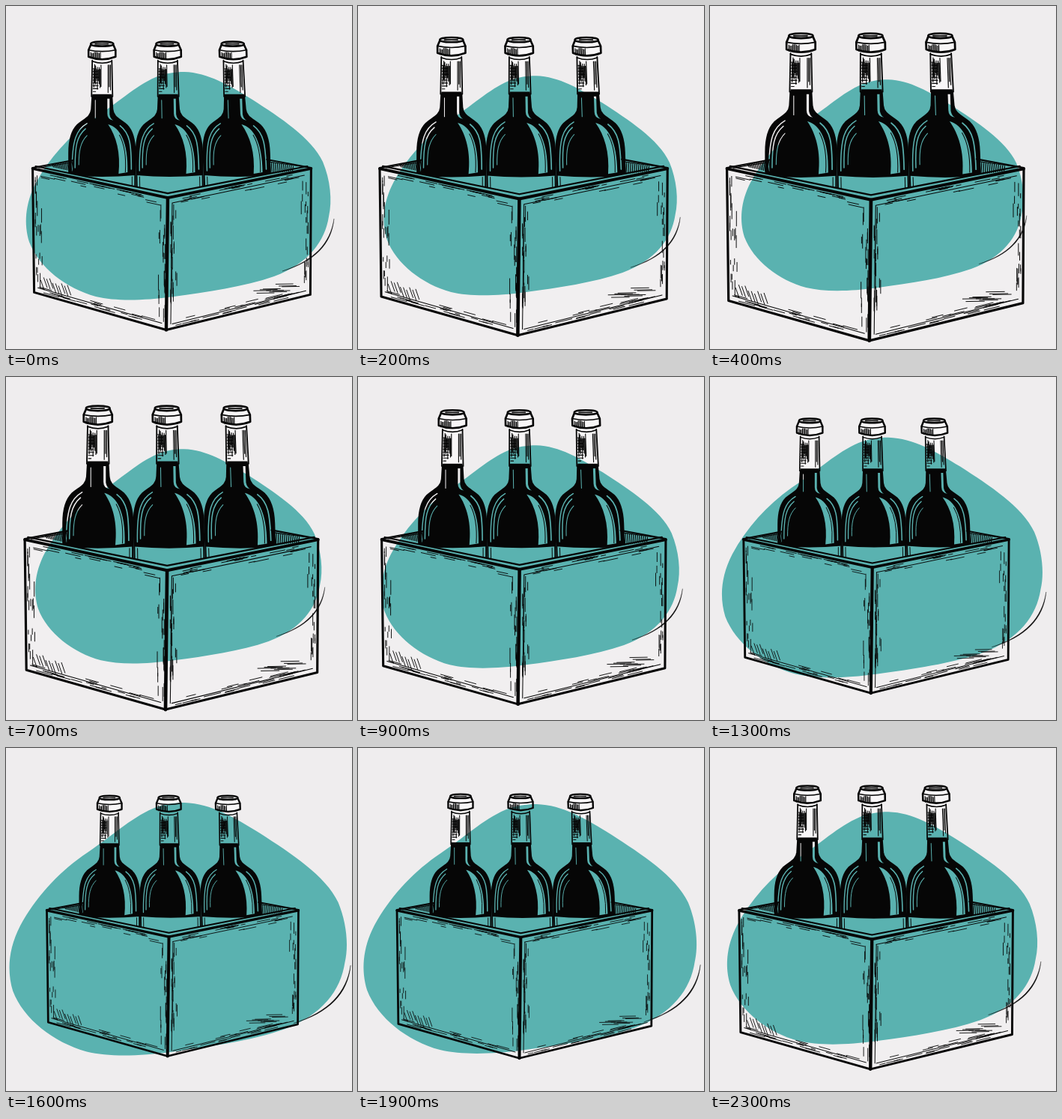
These frames come from a looping animation (462 by 458 pixels, 2.4 s). An HTML page:

```html
<!DOCTYPE html>
<html lang="en">
<head>
<meta charset="utf-8">
<title>Wine crate</title>
<style>
  html, body { margin: 0; width: 100%; height: 100%; overflow: hidden; background: #efedee; }
  svg { display: block; width: 100vw; height: 100vh; }
  .ink { fill: none; stroke: #060606; stroke-linecap: round; stroke-linejoin: round; }
  .solid { fill: #060606; }
  .paper { fill: #f8f6f7; }
</style>
</head>
<body>
<svg viewBox="0 0 462 458">
  <defs>
    <clipPath id="aboveRim"><path d="M0 0H462V204L407 213L216 250L36 213L0 205Z"/></clipPath>

    <mask id="shine" maskUnits="userSpaceOnUse" x="-60" y="100" width="120" height="160">
      <path fill="#fff" d="M-60 100H60V260H-60Z"/>
      <path d="M8 158C24 162 35 182 34 222L22 224C25 196 19 174 8 158Z"/>
      <path d="M7 124H10V145Q11 151 15 153Q7 152 7 144Z"/>
      <g fill="none" stroke="#000" stroke-linecap="round">
        <path stroke-width="1.6" d="M24 160C37 170 39 184 39 218"/>
        <path stroke-width="1.4" d="M-20 157C-34 165-40 178-40 220M-22 164C-34 174-36 188-36 216"/>
        <path stroke-width="1" d="M-20 173C-29 182-31 194-31 212M-9 126V150"/>
      </g>
      <path fill="none" stroke="#fff" stroke-width="1" d="M23 172Q33 190 31 222"/>
    </mask>

    <g id="neck" class="paper">
      <path d="M-15 50Q0 45 15 50L18 59V69L13 73L14 121H-14L-13 73L-18 69V59Z"/>
    </g>

    <g id="bottle">
      <path class="solid" mask="url(#shine)" d="M-13 118H13L14 138C15 149 24 151 33 159C41 167 44 181 44 196V226Q0 230-44 226V196C-44 181-41 167-33 159C-24 151-15 149-14 138Z"/>
      <g class="ink">
        <path stroke-width="2" d="M13 121L14 138C15 149 24 151 33 159C41 167 44 181 44 196V252M-13 121L-14 138C-15 149-24 151-33 159C-41 167-44 181-44 196V252"/>
        <path stroke-width="1" d="M-40 228V252M40 228V252"/>
        <path stroke-width="1.8" d="M-13 73L-14 121Q0 123 14 121L13 73"/>
        <path stroke-width="2.6" d="M-15 51C-15 47 15 47 15 51C15 55-15 55-15 51ZM-15 52L-18 59V68Q0 75 18 68V59L15 52"/>
        <path stroke-width="1.6" d="M-18 59Q0 63 18 59M-13 74Q0 79 13 74M-9 51H8"/>
        <path id="foil" stroke-width="1.1"/>
      </g>
    </g>
  </defs>

  <g class="crate">
    <path fill="#f1eff0" d="M36 217L216 256L407 217L406 385L214 432L38 382Z"/>
    <g id="necks"></g>
  </g>

  <path class="blob" fill="#5ab2b0" d="M238 88C270 89 298 106 329 125C366 149 408 176 423 208C433 232 436 260 431 281C426 314 404 344 358 361C318 375 268 382 224 388C180 394 146 394 120 388C80 377 44 349 31 315C24 292 25 265 40 236C58 203 84 174 115 152C150 129 172 107 200 95C212 90 225 88 238 88Z"/>

  <g class="crate">
    <g class="ink">
      <path stroke-width="2.2" d="M36 216L90 206M407 216L348 205"/>
      <path stroke-width="1.1" d="M44 216L88 209M400 215L350 208"/>
      <path id="walls" stroke-width="1.2"/>
    </g>
    <g id="bottles" clip-path="url(#aboveRim)"></g>
    <g class="ink">
      <path stroke-width="3.8" d="M36 217L216 256L407 217"/>
      <path stroke-width="2.2" d="M40 214L216 250L402 214"/>
      <path stroke-width="3" d="M36 217L38 382L214 432L406 385L407 217"/>
      <path stroke-width="4.4" d="M216 256L214 432"/>
      <path stroke-width="1" d="M43 376L208 423M222 424L400 380M222 263L398 226M222 263L220 424"/>
      <path id="streaks" stroke-width=".9"/>
    </g>
  </g>

  <path class="blob solid" d="M438 284C435 318 412 341.500 369 354C411.500 340 433 317 438 284Z" stroke="#060606" stroke-width=".3"/>
</svg>

<script>
  const LOOP = 2400, STEP = 100, PEAK = 510;
  const byId = id => document.getElementById(id);

  let seed = 11;
  const random = () => (seed = seed * 16807 % 2147483647) / 2147483647;
  const between = (a, b) => a + (b - a) * random();
  const line = (a, b) => `M${a.map(n => n.toFixed(1))}L${b.map(n => n.toFixed(1))}`;
  const repeat = (count, draw) => Array.from({ length: count }, (_, i) => draw(i)).join('');

  const leftFace = (u, v) => [36 + 180 * u, 217 + 39 * u + v * (165 + 11 * u)];
  const rightFace = (u, v) => [216 + 191 * u, 256 - 39 * u + v * (176 - 8 * u)];

  // Broken strokes that run beside the four edges of a face
  function edgeStrokes(face, count) {
    return repeat(count, i => {
      const inset = .02 + .05 * random() ** 2;
      const across = i % 4 < 2 ? inset : 1 - inset;
      const start = between(.05, .85), end = start + between(.03, .12);
      return i % 2
        ? line(face(start, across), face(end, across))
        : line(face(across, start), face(across, end));
    });
  }

  // Short slanted strokes in a lower corner
  function cornerStrokes(face, u, du, dv) {
    return repeat(10, i => {
      const x = u + i * .022, y = between(.85, .9);
      return line(face(x, y), face(x + du, y + dv));
    });
  }

  function drawBottles() {
    const row = id => repeat(3, i => {
      const lean = .017 * i;
      return `<use href="#${id}" transform="matrix(1 0 ${lean} 1 ${128.5 + 90 * i - 225 * lean} 0)"/>`;
    });
    byId('necks').innerHTML = row('neck');
    byId('bottles').innerHTML = row('bottle');
  }

  function drawHatching() {
    byId('streaks').setAttribute('d',
      edgeStrokes(leftFace, 90) + edgeStrokes(rightFace, 90) +
      cornerStrokes(leftFace, .06, .025, .07) + cornerStrokes(rightFace, .6, .12, .03));

    byId('walls').setAttribute('d', repeat(13, i => {
      const left = 62 + i * 2.2, right = 352 + i * 2.6;
      return line([left, 212 - i * .4], [left + 2, 215 + i * .5]) +
        line([right, 208 + i * .5], [right - 1, 224 - i * .35]);
    }));

    byId('foil').setAttribute('d', repeat(9, i => {
      const x = -11 + i * 1.2, cap = -15 + i * 1.6, y = 84 + i * 3.8;
      return line([x, between(77, 86)], [x, between(92, 118)]) +
        line([-12, y], [between(-9, -4), y]) +
        line([cap, between(62, 64)], [cap, 70]);
    }) + repeat(3, i => line([8 + i * 1.6, 79], [8 + i * 1.6, between(95, 116)])));
  }

  // Triangle wave from -1 to 1 with softened turns
  function swing(t) {
    const k = .99;
    return Math.asin(k * Math.cos(2 * Math.PI * (t - PEAK) / LOOP)) / Math.asin(k);
  }

  function scaleAbout(selector, x, y, s) {
    for (const el of document.querySelectorAll(selector)) {
      el.setAttribute('transform', `translate(${x} ${y}) scale(${s}) translate(${-x} ${-y})`);
    }
  }

  function render(now) {
    const pulse = swing(Math.floor(now % LOOP / STEP) * STEP);
    scaleAbout('.crate', 232, 215, .987 + .093 * pulse);
    scaleAbout('.blob', 233, 227, 1.017 - .104 * pulse);
  }

  function tick() {
    render(performance.now());
    requestAnimationFrame(tick);
  }

  drawBottles();
  drawHatching();
  tick();
</script>
</body>
</html>
```
